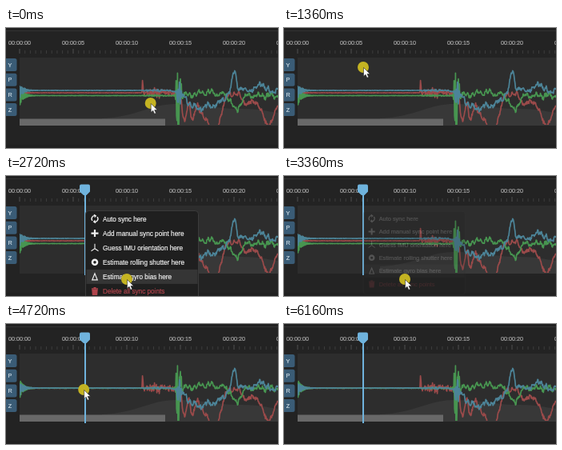
These frames come from a looping animation (340x150 px, 6240 ms). An HTML page:

```html
<!DOCTYPE html>
<html lang="en">
<head>
<meta charset="utf-8">
<title>Gyro timeline</title>
<style>
html, body { margin: 0; width: 100%; height: 100%; overflow: hidden; background: #202020; }
svg { display: block; width: 100vw; height: 100vh; }
text { font-family: "Liberation Sans", Arial, sans-serif; stroke-width: .2; }
.time { font-size: 7.2px; fill: #a8a8a8; stroke: #a8a8a8; text-anchor: middle; }
.axis { font-size: 7.2px; fill: #d0dfe8; stroke: #d0dfe8; text-anchor: middle; }
.item { font-size: 8.2px; fill: #f0f0f0; stroke: #f0f0f0; }
.icon { fill: none; stroke: #f0f0f0; stroke-width: 1.4; }
.danger { fill: #b0444c; stroke: #b0444c; }
.trace { fill: none; stroke-width: 1.7; stroke-linejoin: round; }
</style>
</head>
<body>
<svg viewBox="0 0 340 150">
  <clipPath id="plot"><rect x="17" y="39" width="323" height="82"/></clipPath>
  <rect width="340" height="150" fill="#202020"/>
  <rect y="3" width="340" height="1" fill="#343434"/>
  <rect y="4" width="340" height="142" fill="#232323"/>
  <g id="ruler"></g>
  <rect x="17" y="37" width="323" height="85" fill="#2d2d2d"/>
  <path d="M120 122V113C165 111 180 95 212 95C250 95 262 101 290 101S325 104 340 106V122Z" fill="#383838"/>
  <g id="traces" clip-path="url(#plot)"></g>
  <rect id="scrollbar" x="17" y="113.5" width="182" height="8.5" fill="#686868"/>
  <g id="buttons"></g>
  <g id="playhead" fill="#6fb3dd">
    <rect x="98" y="20" width="2" height="104"/>
    <path d="M94 10.5H103Q105 10.5 105 12.5V19.5L100.5 24H97L92 19.5V12.5Q92 10.5 94 10.5Z"/>
  </g>
  <g id="menu">
    <rect x="99.5" y="43.5" width="141" height="115" rx="4" fill="#1f1f1f" stroke="#3b3b3b"/>
    <rect id="hover" x="100.5" width="139" height="18" fill="#353535"/>
  </g>
  <g id="cursor">
    <circle id="spot" stroke-width="2"/>
    <path d="M.5 .5V11.5L3 9.2L4.8 13.3L6.8 12.4L5 8.5H8.5Z" fill="#fff" stroke="#222" stroke-width=".6"/>
  </g>
</svg>
<script>
const LOOP = 6240;
const $ = id => document.getElementById(id);
const clamp = v => Math.max(0, Math.min(1, v));
const progress = (t, from, duration) => clamp((t - from) / duration);
const easeOut = v => 1 - (1 - v) ** 3;
const bell = (x, centre, width) => Math.exp(-(((x - centre) / width) ** 2));

function add(parent, tag, attrs, text = '') {
  const el = document.createElementNS('http://www.w3.org/2000/svg', tag);
  for (const key in attrs) el.setAttribute(key, attrs[key]);
  el.textContent = text;
  $(parent).append(el);
  return el;
}

// Returns seeded values between -1 and 1
function random(seed) {
  return () => (seed = seed * 16807 % 2147483647) / 1073741823.5 - 1;
}

// Ruler and axis buttons
for (let i = 0; i < 49; i++) {
  const major = i % 10 === 0;
  add('ruler', 'rect', {
    x: 16.5 + i * 6.7, y: major ? 26 : 28, width: 1, height: major ? 6 : 4,
    fill: major ? '#505050' : '#3d3d3d'
  });
}
for (let i = 0; i < 6; i++) {
  add('ruler', 'text', { class: 'time', x: 17 + i * 67, y: 20.5 }, '00:00:' + String(i * 5).padStart(2, '0'));
}
[...'YPRZ'].forEach((name, i) => {
  const y = 38 + i * 18.7;
  add('buttons', 'rect', { x: -4, y, width: 17.5, height: 16, rx: 2.5, fill: '#3a5c76' });
  add('buttons', 'text', { class: 'axis', x: 5, y: y + 10.6 }, name);
});

// Each trace rests, shakes from SHAKE, jolts at JOLT, then wanders along bumps [x, width, height]
const START = 17, SHAKE = 171, JOLT = 216;
const traces = [
  { color: '#9b4a4a', rest: 81, bias: -.8, ring: 5, shake: 8, jolt: 14,
    bumps: [[170.7, .5, -16], [223, 4, 34], [233, 4, 34], [245, 6, 22], [260, 11, 50], [302, 9, 14], [328, 12, 40]] },
  { color: '#479550', rest: 84.5, bias: -4.3, ring: 13, shake: 1.5, jolt: 75,
    bumps: [[250, 20, -4], [288, 7, 18]] },
  { color: '#4c8498', rest: 78, bias: 2, ring: 10, shake: 2, jolt: 20,
    bumps: [[240, 18, 22], [264, 12, 14], [285.5, 3.5, -26], [318, 5, -10]] }
];

function tracePath({ rest, ring, shake, jolt, bumps }, seed) {
  const next = random(seed * 7919);
  const points = [];
  for (let x = START; x < 340; x += .6) {
    const sign = points.length % 2 ? 1 : -1;
    const wander = clamp((x - JOLT) / 8);
    const rough = x < SHAKE ? .2 : x < JOLT ? shake * (.55 + .45 * bell(x, 188, 7)) : 3;
    const wave = 2 * Math.sin(x * .42 + seed * 2) + 1.5 * Math.sin(x * 1.1 + seed * 5);
    const y = rest
      + bumps.reduce((sum, [centre, width, height]) => sum + height * bell(x, centre, width), 0)
      + ring * Math.exp((START - x) / 5) * sign * (.75 + next() / 4)
      + jolt * bell(x, JOLT, 3) * next()
      + rough * (next() + next()) / 2
      + wave * wander;
    points.push(x.toFixed(1) + ' ' + y.toFixed(1));
  }
  return 'M' + points.join('L');
}
traces.forEach((trace, i) => {
  trace.el = add('traces', 'path', { class: 'trace', d: tracePath(trace, i + 1), stroke: trace.color });
});

// Menu rows: label and icon drawn around its own centre
const ROW = 18.1, FIRST = 53.5;
const items = [
  ['Auto sync here', 'M-3 2.4A3.8 3.8 0 0 1 1-3.7M-1-5.3L1.2-3.7L-.4-2M3-2.4A3.8 3.8 0 0 1-1 3.7M1 5.3L-1.2 3.7L.4 2'],
  ['Add manual sync point here', 'M-4.5 0H4.5M0-4.5V4.5', 'stroke-width:2.2'],
  ['Guess IMU orientation here', 'M0-5V1L-4.5 4M0 1L4.5 4', 'stroke-width:1.1'],
  ['Estimate rolling shutter here', 'M-3 0A3 3 0 1 1 3 0A3 3 0 1 1-3 0', 'stroke-width:2.6'],
  ['Estimate gyro bias here', 'M0-4L3.2 4H-3.2Z', 'stroke-width:1.2'],
  ['Delete all sync points', 'M-4-3H4M-1.5-4.3H1.5M-3-1.4L-2.5 4.3H2.5L3-1.4Z']
];
items.forEach(([label, icon, style = ''], i) => {
  const y = FIRST + i * ROW, danger = i === items.length - 1 ? ' danger' : '';
  add('menu', 'path', { class: 'icon' + danger, d: icon, transform: `translate(111 ${y})`, style });
  add('menu', 'text', { class: 'item' + danger, x: 121, y: y + 3 }, label);
});

// Pointer stops: time, x, y
const stops = [
  [0, 181, 94], [520, 33, 84], [640, 56, 82], [1360, 99, 49], [1520, 98, 43], [2160, 98, 43],
  [2680, 151, 129], [3620, 151, 129], [4080, 34, 81], [4320, 28, 81], [5120, 166, 83],
  [5440, 166, 83], [6000, 188, 166], [LOOP, 188, 166]
];
function pointerAt(t) {
  const i = stops.findIndex(stop => stop[0] > t);
  const [t0, x0, y0] = stops[i - 1], [t1, x1, y1] = stops[i];
  const k = (t - t0) / (t1 - t0);
  return [x0 + (x1 - x0) * k, y0 + (y1 - y0) * k];
}

const SEEK = 1600, RIGHT_CLICK = 1840, OPEN = 1920, CLOSE = 3200, CALIBRATED = 3440;

function draw(t) {
  const [x, y] = pointerAt(t);
  const rightDown = t >= RIGHT_CLICK && t < 2120;
  const shown = easeOut(progress(t, OPEN, 240)) * (1 - progress(t, CLOSE, 200));

  $('cursor').setAttribute('transform', `translate(${x} ${y})`);
  $('spot').setAttribute('r', rightDown ? 7 + 2 * progress(t, RIGHT_CLICK, 120) : 7);
  $('spot').setAttribute('fill', rightDown ? '#2aa9a2' : '#c4b322');
  $('spot').setAttribute('stroke', rightDown ? '#2a9fba' : 'none');
  $('playhead').style.display = t < SEEK ? 'none' : '';
  $('scrollbar').setAttribute('opacity', 1 - progress(t, 2080, 400) + progress(t, 3680, 200));
  $('menu').setAttribute('opacity', shown);
  $('menu').setAttribute('transform', `translate(97 50) scale(${.88 + .12 * shown}) translate(-97 -50)`);

  const row = Math.floor((y - FIRST + ROW / 2) / ROW);
  $('hover').style.display = x > 101 && row >= 0 && row < items.length ? '' : 'none';
  $('hover').setAttribute('y', FIRST - 9 + row * ROW);

  for (const { el, bias } of traces) {
    el.setAttribute('transform', `translate(0 ${t < CALIBRATED ? 0 : bias})`);
  }
}

const start = performance.now();
function tick() {
  draw((performance.now() - start) % LOOP);
  requestAnimationFrame(tick);
}
tick();
</script>
</body>
</html>
```
